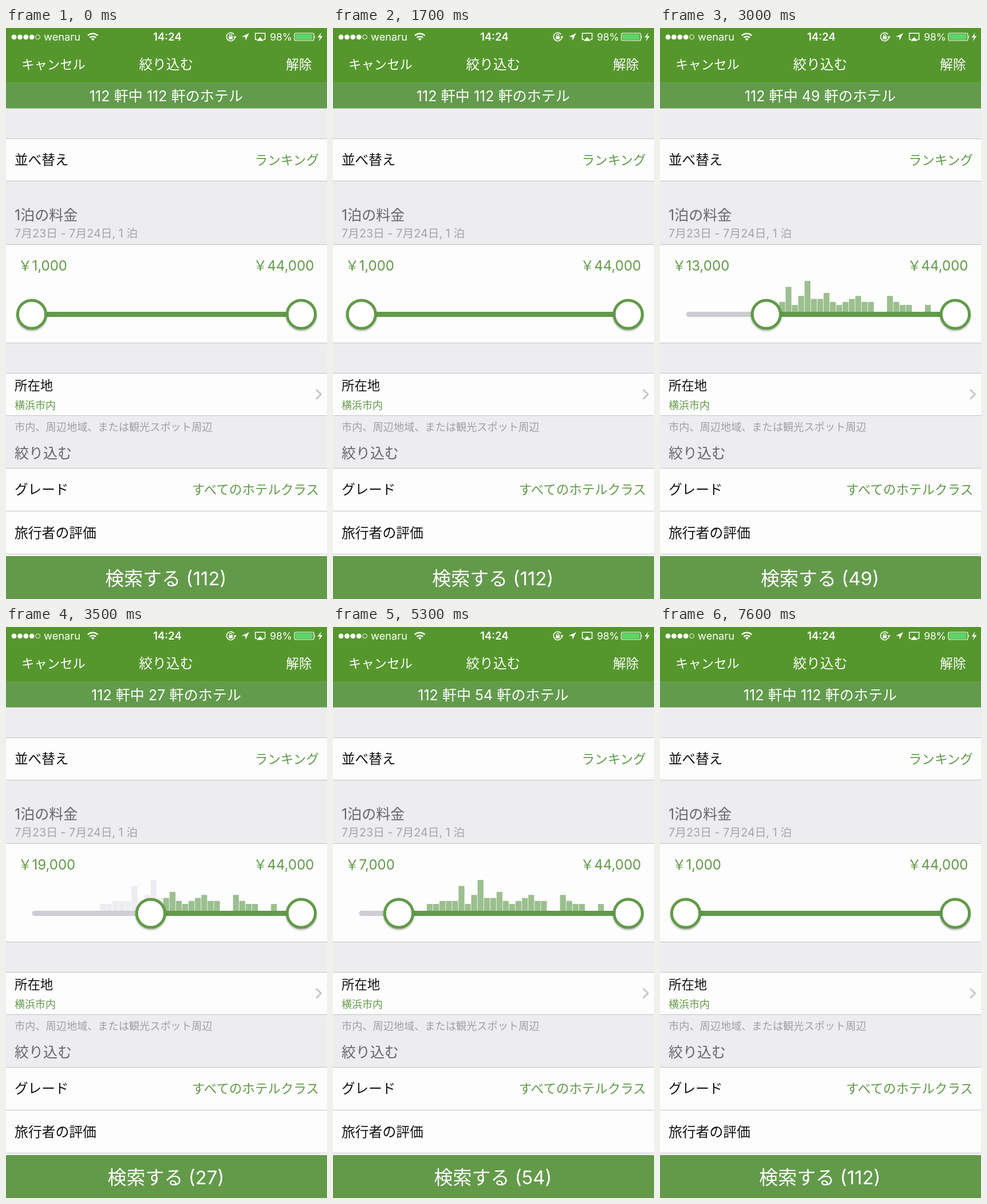
An HTML page for the animation above (7.7 s loop, 561x998 px).

```html
<!DOCTYPE html>
<html lang="ja">
<head>
<meta charset="utf-8">
<title>絞り込む</title>
<style>
  html, body { margin: 0; width: 100%; height: 100%; overflow: hidden; background: #ededef; }
  svg { display: block; width: 561px; height: 998px; }
  text { font-family: Inter, "Noto Sans CJK JP", "Noto Sans CJK", sans-serif; white-space: pre; }
</style>
</head>
<body>
<svg id="stage" viewBox="0 0 561 998" xmlns="http://www.w3.org/2000/svg">
  <defs>
    <filter id="shadow" x="-30%" y="-30%" width="160%" height="160%">
      <feDropShadow dx="0" dy="2" stdDeviation="1.8" flood-color="#000" flood-opacity=".28"/>
    </filter>
  </defs>
  <g id="page"></g>
  <g id="status" fill="none" stroke="#fff" stroke-width="1.5">
    <g id="signal"></g>
    <g stroke-width="2.5">
      <path d="M143 13.3a12.5 12.5 0 0 1 17.4 0M146.3 16.8a7.8 7.8 0 0 1 10.8 0"/>
      <path d="M148.8 19.2a4.2 4.2 0 0 1 5.8 0L151.7 22.2Z" fill="#fff" stroke="none"/>
    </g>
    <path d="M399.8 16.5a7.2 7.2 0 1 1-1.2-5.2"/>
    <path d="M397 14.5h6l-3 4z" fill="#fff" stroke="none"/>
    <rect x="389.5" y="14.5" width="6.6" height="5.2" fill="#fff" stroke="none"/>
    <path d="M390.8 15v-1.8a2 2 0 0 1 4 0V15" stroke-width="1.2"/>
    <path d="M425 9L412 15.3l6.2.5.5 6.2z" fill="#fff" stroke="none"/>
    <path d="M439 20h-3.3V9.3h17V20h-3.3"/>
    <path d="M444.2 15.8l6.2 6.6h-12.4z" fill="#fff" stroke="none"/>
    <rect x="504" y="9" width="34" height="13" rx="2.5" stroke-width="1.2"/>
    <rect x="505.6" y="10.6" width="30" height="9.8" rx="1" fill="#5bd667" stroke="none"/>
    <path d="M539 13.2q2.2 2.3 0 4.6z" fill="#fff" stroke="none"/>
    <path d="M551 8l-6.5 8.6h4.2l-2 6.6 6.6-9h-4.3z" fill="#fff" stroke="none"/>
  </g>
  <g id="slider"></g>
  <g id="labels"></g>
</svg>
<script>
const LOOP = 7700, STEP = 100;
const LEFT = 45, RIGHT = 516, MID = 500.5;
const GREEN = '#629a4a', GREY = '#cdcdd2';
const BAR_X = 164, BAR_W = 11.08;
const hotels = [1, 1, 2, 2, 2, 7, 1, 4, 9, 3, 3, 5, 2, 1, 2, 3, 4, 2, 2, 0, 0, 4, 2, 1, 1, 0, 0, 1];

// time in ms, x of the left knob
const drag = [[0, 45], [1500, 45], [2300, 96], [3500, 253], [4400, 337], [4500, 338], [5300, 115], [5800, 45], [LOOP, 45]];

const $ = id => document.getElementById(id);

function add(parent, tag, attrs, content) {
  const el = document.createElementNS('http://www.w3.org/2000/svg', tag);
  for (const key in attrs) el.setAttribute(key, attrs[key]);
  if (content) el.textContent = content;
  parent.appendChild(el);
  return el;
}

const rect = (y, height, fill) => add($('page'), 'rect', { x: 0, y, width: 561, height, fill });

const label = (content, x, y, size, fill, anchor = 'start', weight = 400) =>
  add($('labels'), 'text', { x, y, fill, 'font-size': size, 'text-anchor': anchor, 'font-weight': weight }, content);

// Page background, cells and bars
rect(0, 998, '#ededef');
for (const [top, bottom] of [[194, 267], [379, 550], [604, 677], [770, 923]]) rect(top, bottom - top, '#fdfdfd');
for (const y of [193, 267, 378, 550, 603, 677, 769, 844, 919]) rect(y, 1, '#c2c1c5');
rect(0, 96, '#55972d');
rect(96, 44.5, '#619b4b');
rect(95.5, 1, '#71a95a');
rect(923, 75, '#629a4a');
add($('page'), 'path', { d: 'M542 632l8.5 8.3-8.5 8.3', fill: 'none', stroke: '#c7c7cc', 'stroke-width': 3 });

for (let i = 0; i < 5; i++)
  add($('signal'), 'circle', { cx: 14 + i * 10.4, cy: 15.8, r: i < 4 ? 4.4 : 3.9, fill: i < 4 ? '#fff' : 'none', stroke: i < 4 ? 'none' : '#fff', 'stroke-width': 1 });

// Text
label('wenaru', 66, 22, 18.3, '#fff');
label('14:24', 282, 22, 18.5, '#fff', 'middle', 600);
label('98%', 500, 22, 17.5, '#fff', 'end');
label('キャンセル', 27, 71.5, 22.4, '#fff');
label('絞り込む', 280, 71.8, 23.7, '#fff', 'middle');
label('解除', 534.5, 71.5, 22.6, '#fff', 'end');
const banner = label('', 280, 128, 25.1, '#fff', 'middle');
label('並べ替え', 15, 239, 23.6, '#111');
label('ランキング', 547, 238.5, 22.6, GREEN, 'end');
label('1泊の料金', 15, 336, 25, '#66666a');
label('7月23日 - 7月24日, 1 泊', 15, 366, 19.8, '#a5a5a9');
const low = label('', 21.5, 424, 24, GREEN);
label('￥44,000', 538.5, 424, 24, GREEN, 'end');
label('所在地', 15, 633.3, 22.4, '#111');
label('横浜市内', 15, 666.3, 18, GREEN);
label('市内、周辺地域、または観光スポット周辺', 15, 704, 18.2, '#a0a0a4');
label('絞り込む', 15, 752, 25, '#66666a');
label('グレード', 15, 815, 23.6, '#111');
label('すべてのホテルクラス', 547, 815, 22.5, GREEN, 'end');
label('旅行者の評価', 15, 890.5, 23.8, '#111');
const button = label('', 279.5, 973.5, 33, '#fff', 'middle');

// Histogram and slider
const slider = $('slider');
const chart = add(slider, 'g', {});
const bars = hotels.map((n, i) => {
  const x = BAR_X + i * BAR_W, height = n ? 7 + n * 5.25 : 0;
  return { n, x, el: add(chart, 'rect', { x, y: 496.3 - height, width: BAR_W - 0.8, height }) };
});
const line = (x1, stroke, cap) =>
  add(slider, 'line', { x1, x2: RIGHT, y1: MID, y2: MID, stroke, 'stroke-width': 9, 'stroke-linecap': cap });
line(LEFT + 5, GREY, 'round');
const range = line(LEFT, GREEN, 'butt');
const knob = cx => add(slider, 'circle', { cx, cy: MID, r: 24.6, fill: '#fff', stroke: GREEN, 'stroke-width': 5, filter: 'url(#shadow)' });
const lowKnob = knob(LEFT);
knob(RIGHT);

const slope = i => (drag[i + 1][1] - drag[i][1]) / (drag[i + 1][0] - drag[i][0]);

// Tangent that never overshoots the neighbouring points
function tangent(i) {
  if (i === 0 || i === drag.length - 1) return 0;
  const a = slope(i - 1), b = slope(i);
  return a * b > 0 ? 2 * a * b / (a + b) : 0;
}

function knobX(t) {
  let i = 0;
  while (i < drag.length - 2 && t >= drag[i + 1][0]) i++;
  const [t0, x0] = drag[i], [t1, x1] = drag[i + 1];
  const d = t1 - t0, u = (t - t0) / d, v = 1 - u;
  return x0 * v * v * (1 + 2 * u) + x1 * u * u * (3 - 2 * u)
    + d * u * v * (v * tangent(i) - u * tangent(i + 1));
}

function draw(t) {
  const x = knobX(t);
  const price = 1 + Math.floor((x - LEFT) / (RIGHT - LEFT) * 43 + 1e-6);
  let sum = 0;
  for (const bar of bars) {
    const inside = bar.x > x + 18;
    if (inside) sum += bar.n;
    bar.el.setAttribute('fill', inside ? '#9cbf8f' : '#ededf1');
  }
  // Hotels without a price count only while the range is full
  const count = price > 1 ? Math.ceil(sum * 9 / 11) : 112;
  chart.setAttribute('opacity', Math.max(0, Math.min(1, (x - 52) / 8)));
  range.setAttribute('x1', x);
  lowKnob.setAttribute('cx', x);
  low.textContent = `￥${price},000`;
  banner.textContent = `112 軒中 ${count} 軒のホテル`;
  button.textContent = `検索する (${count})`;
}

const start = performance.now();
function tick() {
  const t = (performance.now() - start) % LOOP;
  draw(Math.floor(t / STEP) * STEP);
  requestAnimationFrame(tick);
}
tick();
</script>
</body>
</html>
```
